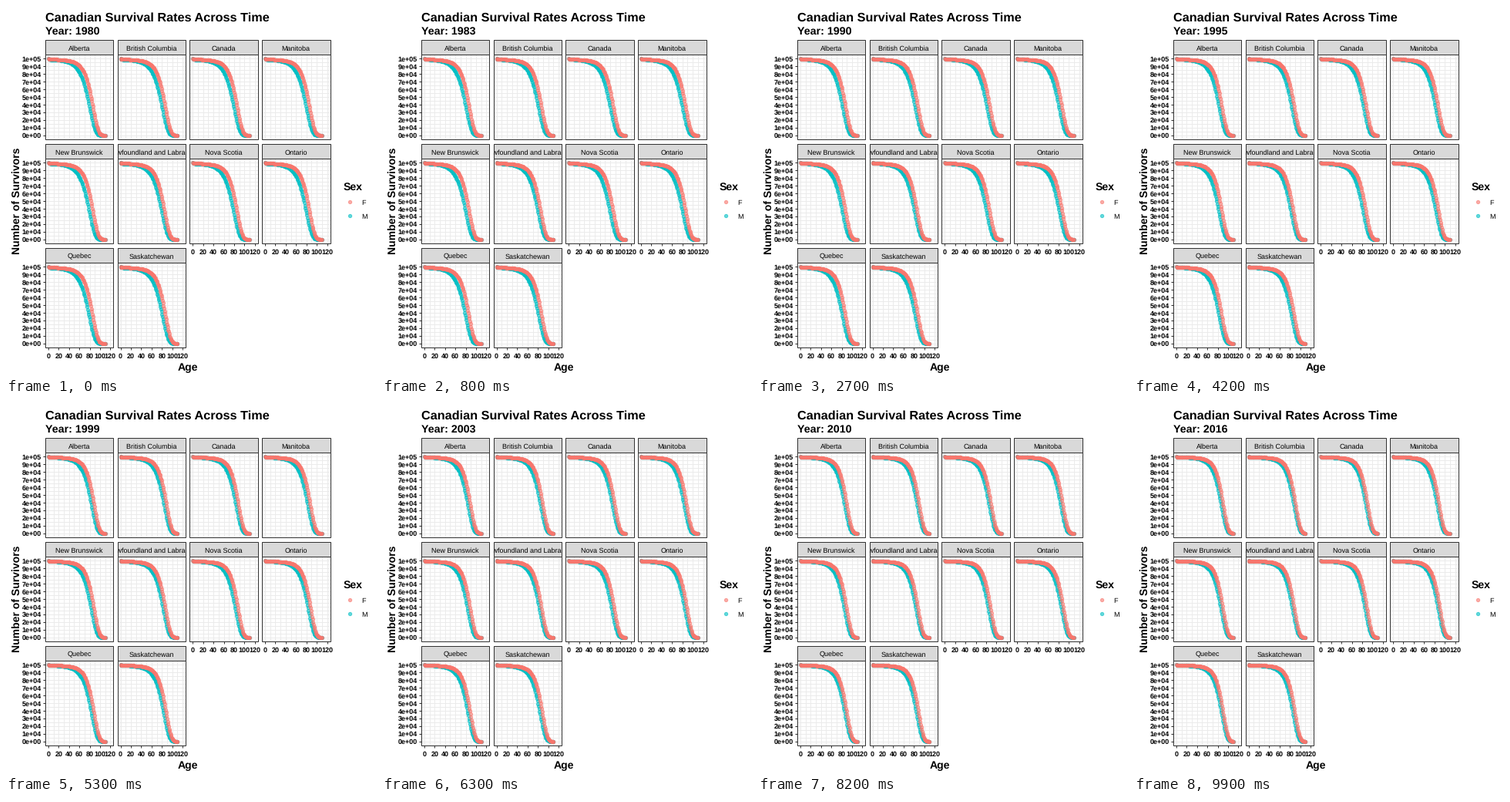
A matplotlib script for the animation above (10 s loop, 480 by 480 pixels).

```python
import numpy as np
import matplotlib.pyplot as plt
from matplotlib.animation import FuncAnimation
from matplotlib.collections import LineCollection
from matplotlib.patches import Rectangle

SIZE, DPI = 480, 72          # at 72 dpi one point is one pixel
FRAMES, INTERVAL = 100, 100
FIRST, LAST = 1980, 2016

DARK, GRID, STRIP = "#333333", "#EBEBEB", "#D9D9D9"
COLORS = {"M": "#00BFC4", "F": "#F8766D"}

W, H, STRIP_H = 88.6, 109.4, 19.3
COL_STEP, ROW_STEP = 93.7, 135
LEFT, TOP = 50.85, 63.3

# name: (female, male) shift in median age at the first and last year
REGIONS = {
    "Alberta": (0.4, 0.2, 0.0, -0.4),
    "British Columbia": (0.6, 0.8, 0.4, 0.5),
    "Canada": (0.0, 0.0, 0.0, 0.0),
    "Manitoba": (0.2, 0.2, -1.4, -1.7),
    "New Brunswick": (0.2, -0.5, -0.3, -0.8),
    "Newfoundland and Labrador": (-1.0, 0.0, -2.0, -2.2),
    "Nova Scotia": (-0.4, -0.7, -1.0, -1.4),
    "Ontario": (0.1, 0.1, 0.3, 0.4),
    "Quebec": (-0.4, -0.9, 0.2, 0.4),
    "Saskatchewan": (0.8, 1.2, -0.8, -1.3),
}

# (first, last) values: median age, ageing rate, infant deaths, base hazard
MORTALITY = {
    "F": ((82.4, 87.2), (0.100, 0.109), (0.0095, 0.0045), (0.00035, 0.00025)),
    "M": ((75.7, 83.5), (0.092, 0.101), (0.0120, 0.0050), (0.0005, 0.0004)),
}
AGES = np.arange(111)

plt.rcParams.update({"font.family": "Liberation Sans", "text.hinting": "none"})
fig = plt.figure(figsize=(SIZE / DPI, SIZE / DPI), dpi=DPI, facecolor="white")
ax = fig.add_axes([0, 0, 1, 1])
ax.set(xlim=(0, SIZE), ylim=(SIZE, 0))
ax.axis("off")


def mix(pair, u):
    return pair[0] + (pair[1] - pair[0]) * u


def corner(k):
    return LEFT + COL_STEP * (k % 4), TOP + ROW_STEP * (k // 4)


def to_x(x0, age):
    return x0 + (age + 6) * W / 132


def to_y(y0, share):
    return y0 + (1.05 - share) * H / 1.1


def label(x, y, s, size=9, bold=False, ha="center", **kw):
    return ax.text(x, y, s, fontsize=size, ha=ha, va="baseline",
                   weight="bold" if bold else "normal", color="black", **kw)


def lines(segments, color, z):
    ax.add_collection(LineCollection(segments, colors=color, linewidths=1,
                                     zorder=z, snap=True, capstyle="butt"),
                      autolim=False)


def box(x, y, w, h, fill, z):
    patch = Rectangle((x, y), w, h, facecolor=fill, edgecolor=DARK,
                      linewidth=1, zorder=z, snap=True)
    return ax.add_patch(patch)


def draw_panel(k, name):
    x0, y0 = corner(k)
    xs = [to_x(x0, a) for a in range(0, 121, 10)]
    ys = [to_y(y0, s / 20) for s in range(21)]
    lines([[(x, y0), (x, y0 + H)] for x in xs], GRID, 1)
    lines([[(x0, y), (x0 + W, y)] for y in ys], GRID, 1)
    box(x0, y0, W, H, "none", 5)
    strip = box(x0, y0 - STRIP_H, W, STRIP_H, STRIP, 5)
    text = label(x0 + W / 2, y0 - 5.7, name, zorder=6, clip_on=True)
    text.set_clip_path(strip)

    if k % 4 == 0:
        lines([[(x0 - 3, y), (x0, y)] for y in ys[::2]], DARK, 4)
        for i, y in enumerate(ys[::2]):
            s = "1e+05" if i == 10 else f"{i}e+0{4 if i else 0}"
            label(x0 - 4.8, y + 3.5, s, bold=True, ha="right")
    if k + 4 >= len(REGIONS):
        base = y0 + H
        lines([[(x, base), (x, base + 3)] for x in xs[::2]], DARK, 4)
        for i, x in enumerate(xs[::2]):
            label(x, base + 13.8, str(20 * i), bold=True)


def survivors(sex, shifts, u):
    """Share alive at each age: infant loss, constant hazard, Gompertz ageing."""
    median, rate, infant, hazard = (mix(p, u) for p in MORTALITY[sex])
    j = 0 if sex == "F" else 1
    median += mix((shifts[j], shifts[j + 2]), u)
    ageing = np.log(2) * (np.exp(rate * (AGES - median)) - np.exp(-rate * median))
    young = hazard * np.clip(AGES - 12, 0, 50)
    return np.where(AGES > 0, 1 - infant, 1) * np.exp(-ageing - young)


for k, name in enumerate(REGIONS):
    draw_panel(k, name)

label(51, 19.4, "Canadian Survival Rates Across Time", 16.3, True, "left")
year_text = label(51, 37, "", 14.3, True, "left")
label(235.5, 473, "Age", 14, True)
label(17.5, 253, "Number of Survivors", 14, True, rotation=90,
      rotation_mode="anchor")
label(437.5, 239, "Sex", 14, True, "left")

MARK = dict(ls="none", marker="o", ms=4.3, mew=1, alpha=0.6)
for sex, y in (("F", 254), ("M", 272)):
    ax.plot([446.3], [y], color=COLORS[sex], **MARK)
    label(461.5, y + 4.2, sex, ha="left")

all_x = np.concatenate([to_x(corner(k)[0], AGES) for k in range(len(REGIONS))])
dots = {sex: ax.plot(all_x, all_x, color=c, zorder=3, **MARK)[0]
        for sex, c in COLORS.items()}


def update(i):
    u = i / (FRAMES - 1)
    year_text.set_text(f"Year: {round(mix((FIRST, LAST), u))}")
    for sex, dot in dots.items():
        dot.set_ydata(np.concatenate([
            to_y(corner(k)[1], survivors(sex, shifts, u))
            for k, shifts in enumerate(REGIONS.values())]))
    return [year_text, *dots.values()]


anim = FuncAnimation(fig, update, frames=FRAMES, interval=INTERVAL,
                     repeat=True, repeat_delay=0)
plt.show()
```
